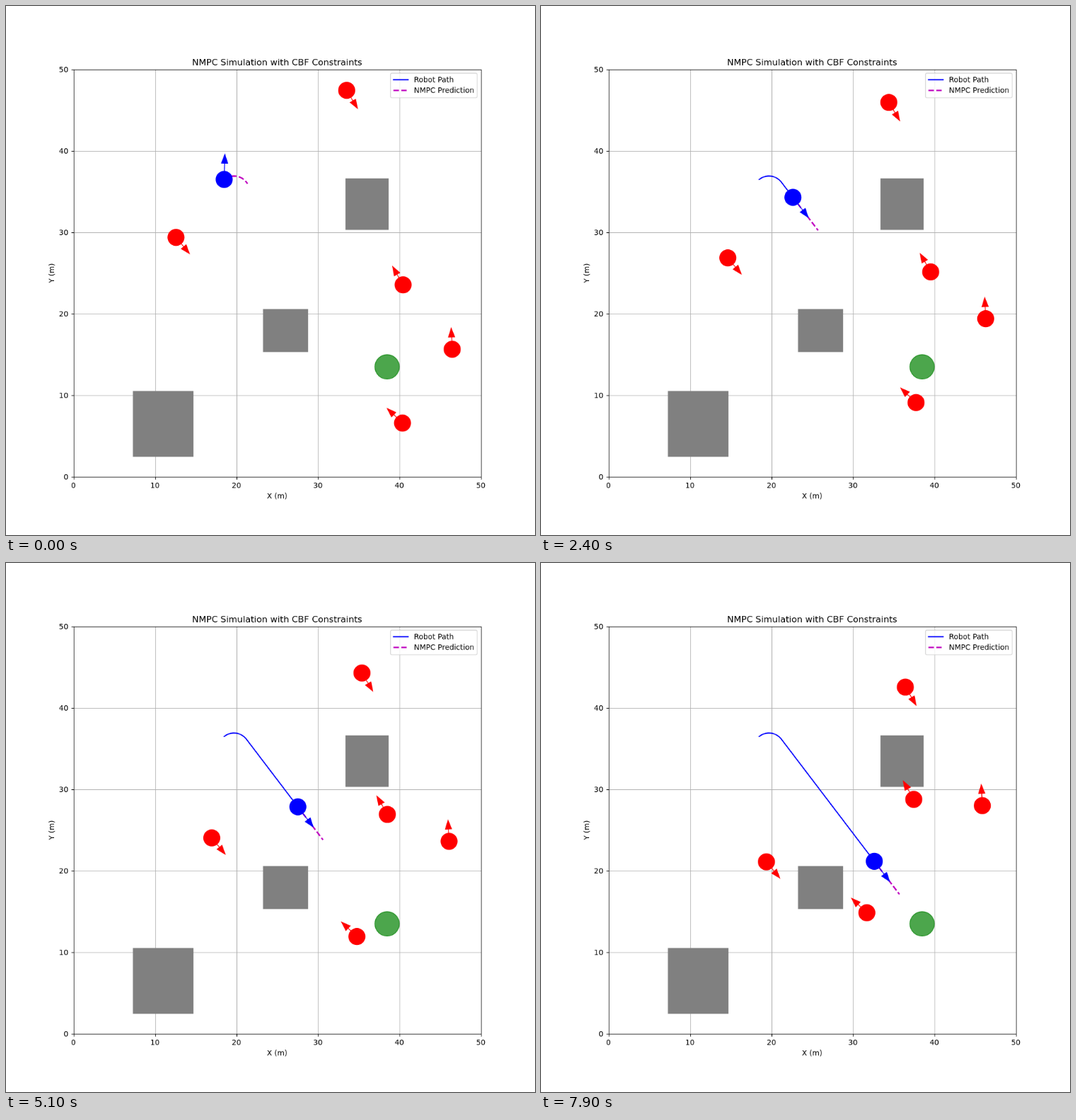
Recreate the animation shown at these times as an HTML page with a canvas. Size 748 by 748 pixels, loop 8000 ms.

```html
<!DOCTYPE html>
<html lang="en">
<head>
<meta charset="utf-8">
<title>NMPC Simulation</title>
<style>
html, body { margin: 0; width: 100%; height: 100%; overflow: hidden; background: #fff; }
canvas { display: block; width: 748px; height: 748px; }
</style>
</head>
<body>
<canvas id="stage" width="1000" height="1000"></canvas>
<script>
// The figure is 1000 px square at 100 dpi and shown scaled down to the stage.
const ctx = document.getElementById('stage').getContext('2d');
const PT = 100 / 72, UNIT = 15.4;
const LEFT = 127.5, BOTTOM = 890;
const STEPS = 80, STEP_MS = 100, HORIZON = 17;
const DASH = [7.4 * PT, 3.2 * PT];
const px = x => LEFT + x * UNIT;
const py = y => BOTTOM - y * UNIT;
const snap = v => Math.floor(v + 0.5) + 0.5;

// Left, top, right, bottom in figure pixels
const blocks = [
  [240.5, 728.5, 353.5, 851.5],
  [486.5, 573.5, 570.5, 653.5],
  [642.5, 326.5, 722.5, 422.5]
];

// Start in metres, velocity in metres per step
const movers = [
  [33.5, 47.5, 0.0368, -0.0617],
  [12.5, 29.5, 0.0861, -0.1048],
  [40.5, 23.5, -0.0378, 0.066],
  [46.5, 15.5, -0.0076, 0.1564],
  [40.5, 6.5, -0.1098, 0.1045]
];

// The robot turns on the spot for six steps, then drives while turning to its course.
const path = (() => {
  const speed = 0.3, points = [];
  let x = 18.5, y = 36.5;
  for (let i = 0; i < STEPS + HORIZON; i++) {
    const angle = Math.max(88.5 - 9 * i, -52.73) * Math.PI / 180;
    points.push({ x: px(x), y: py(y), angle: -angle });
    if (i >= 6) {
      x += speed * Math.cos(angle);
      y += speed * Math.sin(angle);
    }
  }
  return points;
})();

function line(points, color, width, dash = [], cap = 'butt') {
  ctx.beginPath();
  points.forEach(([x, y]) => ctx.lineTo(x, y));
  ctx.strokeStyle = color;
  ctx.lineWidth = width * PT;
  ctx.lineCap = cap;
  ctx.lineJoin = 'round';
  ctx.setLineDash(dash);
  ctx.stroke();
  ctx.setLineDash([]);
}

function text(str, x, y, align = 'center', size = 10) {
  ctx.font = `${size * PT}px "DejaVu Sans", sans-serif`;
  ctx.textAlign = align;
  ctx.fillStyle = '#000';
  ctx.fillText(str, x, y);
}

function paint(color) {
  ctx.fillStyle = ctx.strokeStyle = color;
  ctx.lineWidth = PT;
  ctx.lineCap = 'butt';
  ctx.lineJoin = 'miter';
  ctx.fill();
  ctx.stroke();
}

function disc(x, y, radius, color) {
  ctx.beginPath();
  ctx.arc(x, y, radius * UNIT, 0, 2 * Math.PI);
  ctx.closePath();
  paint(color);
}

function arrow(x, y, angle, shaft, color) {
  const neck = shaft * UNIT, tip = neck + 1.08 * UNIT, half = 0.38 * UNIT;
  ctx.save();
  ctx.translate(x, y);
  ctx.rotate(angle);
  ctx.beginPath();
  ctx.moveTo(0, 0);
  ctx.lineTo(neck, 0);
  paint(color);
  ctx.beginPath();
  ctx.moveTo(tip, 0);
  ctx.lineTo(neck, half);
  ctx.lineTo(neck, -half);
  ctx.closePath();
  paint(color);
  ctx.restore();
}

function grid() {
  for (let v = 10; v < 50; v += 10) {
    const x = snap(px(v)), y = snap(py(v));
    line([[x, 120.5], [x, 890.5]], '#b0b0b0', 0.8);
    line([[128.5, y], [898.5, y]], '#b0b0b0', 0.8);
  }
}

function axes() {
  const tick = 3.5 * PT;
  for (let v = 0; v <= 50; v += 10) {
    const x = snap(px(v)), y = snap(py(v));
    line([[x, 890.5], [x, 890.5 + tick]], '#000', 0.8);
    line([[128.5 - tick, y], [128.5, y]], '#000', 0.8);
    text(v, px(v), 911);
    text(v, LEFT - 2 * tick, y + 4.8, 'right');
  }
  ctx.lineJoin = 'miter';
  ctx.strokeStyle = '#000';
  ctx.lineWidth = 0.8 * PT;
  ctx.strokeRect(128.5, 120.5, 770, 770);
  text('NMPC Simulation with CBF Constraints', px(25), 112, 'center', 12);
  text('X (m)', px(25), 931);
  ctx.save();
  ctx.translate(91, py(25));
  ctx.rotate(-Math.PI / 2);
  text('Y (m)', 0, 0);
  ctx.restore();
}

function legend() {
  ctx.beginPath();
  ctx.roundRect(726.8, 127, 163.8, 46.6, 2 * PT);
  ctx.fillStyle = 'rgba(255,255,255,.8)';
  ctx.fill();
  ctx.strokeStyle = 'rgba(204,204,204,.8)';
  ctx.lineWidth = PT;
  ctx.stroke();
  line([[732.4, 139.3], [760.2, 139.3]], '#00f', 1.5, [], 'square');
  line([[732.4, 159.7], [760.2, 159.7]], '#bf00bf', 2, DASH);
  text('Robot Path', 771.3, 144, 'left');
  text('NMPC Prediction', 771.3, 164.4, 'left');
}

function draw(step) {
  const robot = path[step];
  const part = (from, to) => path.slice(from, to).map(p => [p.x, p.y]);
  ctx.fillStyle = '#fff';
  ctx.fillRect(0, 0, 1000, 1000);
  grid();
  line(part(0, step + 1), '#00f', 1.5, [], 'square');
  line(part(step, step + HORIZON + 1), '#bf00bf', 2, DASH);
  blocks.forEach(([l, t, r, b]) => {
    ctx.beginPath();
    ctx.rect(l, t, r - l, b - t);
    paint('#808080');
  });
  disc(px(38.5), py(13.5), 1.5, 'rgba(0,128,0,.7)');
  movers.forEach(([x0, y0, vx, vy]) => {
    const x = px(x0 + vx * (step + 1)), y = py(y0 + vy * (step + 1));
    disc(x, y, 1, '#f00');
    arrow(x, y, Math.atan2(-vy, vx), 1.5, '#f00');
  });
  disc(robot.x, robot.y, 1, '#00f');
  arrow(robot.x, robot.y, robot.angle, 2, '#00f');
  axes();
  legend();
}

const start = performance.now();
function tick() {
  draw(Math.floor((performance.now() - start) / STEP_MS) % STEPS);
  requestAnimationFrame(tick);
}
tick();
</script>
</body>
</html>
```
